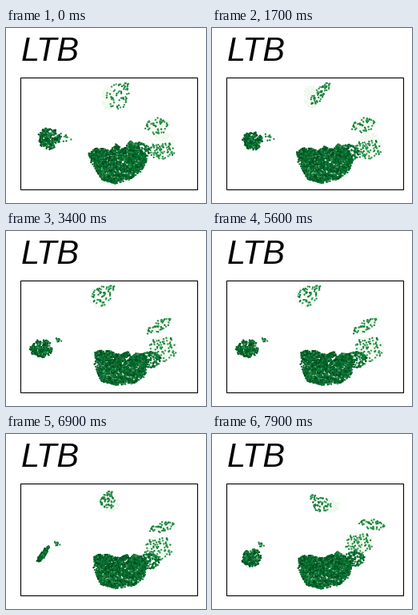
A matplotlib script that plays this animation: 250x219 px, repeating every 8000 ms.

```python
import numpy as np
import matplotlib.pyplot as plt
from matplotlib.animation import FuncAnimation
from matplotlib.patches import Rectangle

W, H, DPI = 250, 219, 64
PX = 72 / DPI
FRAMES, INTERVAL = 80, 100
MORPH = 30                      # frames per morph between layouts
STARTS = (4, 55)                # last still frame before each morph
rng = np.random.default_rng(7)
greens = plt.get_cmap("Greens")


def ellipse(cx, cy, rx, ry, rot=0, flip=1, tilt=0):
    """Map unit-disc samples to an ellipse; rot and flip act inside the disc."""
    def place(r, theta):
        a = flip * theta + np.radians(rot)
        x, y, t = rx * r * np.cos(a), ry * r * np.sin(a), np.radians(tilt)
        return np.column_stack([cx + x * np.cos(t) - y * np.sin(t),
                                cy + x * np.sin(t) + y * np.cos(t)])
    return place


def star(center, outline):
    """Map unit-disc samples to a star-shaped polygon."""
    center, pts = np.array(center), np.array(outline + outline[:1])

    def place(r, theta):
        s = theta / (2 * np.pi) * len(outline)
        knots = np.arange(len(pts))
        edge = np.column_stack([np.interp(s, knots, pts[:, i]) for i in (0, 1)])
        return center + r[:, None] * (edge - center)
    place.center, place.pts = center, pts
    return place


def sample(n, shape):
    r = np.sqrt(rng.random(n))
    if not hasattr(shape, "pts"):
        return r, rng.random(n) * 2 * np.pi
    a, b = shape.pts[:-1] - shape.center, shape.pts[1:] - shape.center
    area = np.abs(a[:, 0] * b[:, 1] - a[:, 1] * b[:, 0])
    sector = rng.choice(len(area), n, p=area / area.sum())
    return r, (sector + rng.random(n)) / len(area) * 2 * np.pi


main = (
    star((137, 172), [(103, 158), (111, 150), (123, 151), (130, 154), (137, 145),
                      (146, 152), (155, 141), (168, 151), (177, 164), (170, 178),
                      (157, 188), (137, 195), (120, 190), (109, 172)]),
    star((142, 171), [(111, 153), (116, 149), (131, 150), (137, 154), (146, 154),
                      (152, 151), (162, 154), (172, 154), (176, 165), (174, 181),
                      (161, 190), (138, 193), (119, 188), (112, 172)]),
    star((138, 172), [(108, 157), (113, 152), (125, 152), (134, 155), (143, 154),
                      (149, 151), (156, 147), (168, 154), (175, 165), (171, 178),
                      (160, 188), (137, 194), (118, 189), (109, 172)]),
)

# count, expression range, placement in each of the three layouts
clusters = [
    # faint, low-expression cells
    (130, (.02, .09), ellipse(128, 87, 8, 15), ellipse(117, 82, 13, 14),
     ellipse(148, 90, 12, 8)),
    (110, (.02, .09), ellipse(190, 121, 15, 10), ellipse(193, 118, 17, 6, tilt=-28),
     ellipse(202, 113, 14, 6, tilt=12)),
    (190, (.02, .09), ellipse(196, 147, 15, 17), ellipse(197, 147, 17, 16),
     ellipse(184, 135, 16, 13)),
    # top island and its tail
    (52, (.65, .85), ellipse(140, 86, 15, 16, -94, -1), ellipse(119, 81, 12, 13),
     ellipse(137, 89, 13, 9, -80)),
    (13, (.65, .85), ellipse(151, 74, 5, 6), ellipse(133, 72, 6, 4),
     ellipse(127, 80, 5, 4)),
    # right wing
    (48, (.65, .85), ellipse(188, 123, 15, 10), ellipse(191, 119, 18, 6, tilt=-28),
     ellipse(200, 113, 17, 6, tilt=12)),
    (80, (.65, .85), ellipse(194, 153, 17, 11), ellipse(195, 147, 18, 17),
     ellipse(183, 136, 17, 14)),
    (140, (.75, .98), ellipse(166, 154, 14, 11), ellipse(180, 161, 14, 10),
     ellipse(178, 156, 13, 9)),
    # left island and its satellite
    (270, (.8, 1), ellipse(54, 138, 13.5, 13.5, 60), ellipse(44, 147, 14, 11),
     ellipse(50, 155.5, 13, 11, -122, -1)),
    (11, (.65, .9), ellipse(74, 137, 7, 6), ellipse(65.5, 136.5, 3, 2.5),
     ellipse(61, 138.5, 3, 3)),
    (1900, (.8, 1), *main),
]

layouts, values = [[], [], []], []
for n, span, *shapes in clusters:
    r, theta = sample(n, shapes[0])
    jitter = rng.normal(0, .4, (n, 2))
    for layout, shape in zip(layouts, shapes):
        layout.append(shape(r, theta) + jitter)
    values.append(rng.uniform(*span, n))
layouts = [np.vstack(layout) for layout in layouts]
values = np.concatenate(values)

# a few weaker cells among the strong ones
weak = (values > .8) & (rng.random(len(values)) < .1)
values[weak] = rng.uniform(.65, .8, weak.sum())

# faint cells stay underneath, the rest overlap at random
order = np.argsort(np.where(values < .3, 0, 1 + rng.random(len(values))))
layouts = [layout[order] for layout in layouts]
values = values[order]


def ease(t):
    t = np.clip(t, 0, 1)
    return 4 * t**3 if t < .5 else 1 - 4 * (1 - t)**3


fig = plt.figure(figsize=(W / DPI, H / DPI), dpi=DPI, facecolor="white")
ax = fig.add_axes([0, 0, 1, 1])
ax.set(xlim=(0, W), ylim=(H, 0))
ax.axis("off")
ax.text(18.5, 41, "LTB", family="Liberation Sans", style="italic",
        size=41.5 * PX, va="baseline", color="black")
ax.add_patch(Rectangle((17.5, 61.5), 221, 140, fill=False, ec="black", lw=1.1 * PX))
dots = ax.scatter(*layouts[0].T, s=(2.3 * PX)**2, c=greens(values), linewidths=0)


def update(i):
    first, second = (ease((i - start) / MORPH) for start in STARTS)
    a, b, c = layouts
    dots.set_offsets(a + first * (b - a) + second * (c - b))
    return dots,


anim = FuncAnimation(fig, update, frames=FRAMES, interval=INTERVAL,
                     repeat=True, repeat_delay=0)
plt.show()
```
